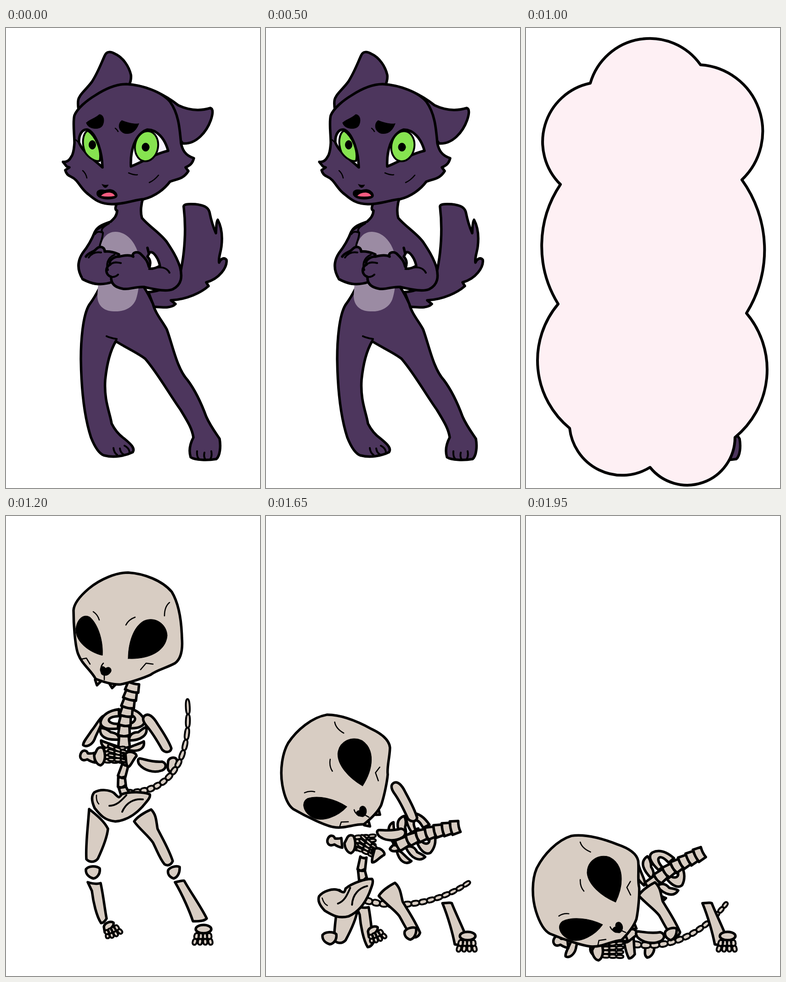
Recreate the animation shown at these times as an HTML page. Size 553 by 1000 pixels, loop 2.25 s.

```html
<!DOCTYPE html>
<html lang="en">
<head>
<meta charset="utf-8">
<title>Cat to bones</title>
<style>
html, body { margin: 0; width: 100%; height: 100%; overflow: hidden; background: #fff; }
svg { display: block; width: 100%; height: 100%; }
path, ellipse { stroke: #000; stroke-width: 5.5; stroke-linejoin: round; stroke-linecap: round; }
#cat { fill: #4d365d; }
#bones { fill: #d8cdc3; }
#puff { fill: #fef0f4; }
#puff path { vector-effect: non-scaling-stroke; stroke-width: 6; }
.line { fill: none; }
.thin { fill: none; stroke-width: 2.5; }
.ink { fill: #000; stroke-width: 1; }
.flat { stroke: none; }
.small { stroke-width: 4; }
</style>
</head>
<body>
<svg viewBox="0 0 553 1000">
<g id="cat">
  <path d="M387 390C385 383 395 382 412 383C430 385 440 389 443 400C447 420 452 435 457 446C458 435 457 423 461 417C468 430 472 450 469 475C467 490 462 500 464 510C467 503 474 497 480 504C482 520 465 545 436 553L441 561C425 575 395 590 359 592L369 600C360 610 340 607 322 606L310 574C345 573 380 545 382 520C388 490 393 440 387 390Z"/>
  <path d="M243 378C236 392 238 396 242 397C241 410 234 415 228 421C212 427 200 430 193 444C186 462 178 475 167 489C153 510 157 530 167 546C180 552 190 557 205 557L203 566C196 580 190 590 181 602C167 625 163 680 163 720C164 790 172 850 185 890C193 910 202 925 213 929C235 935 260 930 276 922C282 913 270 903 258 893C245 884 236 872 230 860C226 835 213 810 216 765C219 735 225 705 239 681C265 697 288 707 303 719C330 750 355 795 380 830C395 855 405 870 408 890C400 905 398 920 402 933C412 940 440 940 458 937C466 930 468 910 465 893C455 878 445 865 436 845C425 815 410 785 395 765C372 740 363 690 350 655C340 637 325 620 320 600C312 582 306 572 300 563C330 570 350 573 363 568C383 558 384 540 379 520C372 498 360 480 350 465C335 445 312 432 296 413C292 400 294 382 299 368"/>
  <path class="flat" fill="#9b8ba3" d="M238 443C265 443 285 470 290 500C292 540 290 570 283 590C275 610 255 617 235 616C210 616 198 600 199 580C203 530 203 500 206 475C210 455 222 443 238 443Z"/>
  <path fill="#fff" d="M313 488C320 484 332 500 335 517C325 523 318 524 311 523C315 515 316 505 308 497Z"/>
  <path class="line" d="M311 490L308 478"/>
  <path d="M174 497C180 487 190 488 196 481C204 472 215 476 215 486C230 484 240 490 246 492L232 552C205 561 185 556 167 546"/>
  <path d="M300 563C280 562 270 569 255 567C237 564 228 556 229 541C216 537 215 520 227 514C222 506 236 496 246 497C262 493 272 494 277 497C273 488 285 485 292 490C302 500 308 505 311 519"/>
  <path class="line small" d="M180 499C186 490 196 486 207 488M227 514C234 508 242 509 250 511M229 541C236 542 240 540 244 536M222 526C218 515 220 500 236 493M318 524C335 517 350 520 356 532M211 446C210 460 205 466 204 475M194 448C198 441 206 443 211 445C203 438 215 430 224 425M196 440L218 426M219 670C227 674 235 675 241 676L239 681"/>
  <path class="line small" d="M234 913Q235 923 242 928M248 914Q249 923 256 927M258 908Q268 913 269 922M416 920Q415 932 420 937M432 923Q430 933 434 938M447 920Q449 931 445 937"/>
  <path d="M158 178C156 165 156 155 160 150C163 142 175 133 187 117C200 97 208 75 215 60C219 50 228 51 237 56C255 64 268 84 272 102C273 110 270 120 268 125"/>
  <path d="M264 123C310 125 350 148 375 168C400 180 425 180 445 174C452 176 450 188 446 200C437 225 415 253 385 251L345 200"/>
  <path d="M262 122C240 122 215 133 195 146C175 158 155 175 149 190C145 205 149 230 149 250C148 265 146 275 142 280C138 288 132 292 124 291L132 301L138 303L129 309C131 317 136 321 141 323C157 330 160 345 175 358C190 370 200 382 230 383C260 383 280 373 300 372C325 366 345 350 357 334C372 328 386 329 397 311L391 303C400 299 406 295 409 283C390 277 384 265 381 250C378 215 375 185 357 160C340 140 300 124 262 122Z"/>
  <path class="ink" d="M175 206C180 200 195 196 203 188C212 188 216 200 210 212C205 222 178 221 175 206ZM289 208C278 210 262 205 252 201C243 208 244 224 258 229C275 232 284 222 289 208Z"/>
  <path class="thin" d="M238 218Q241 220 244 225M167 310Q174 316 176 326M267 315Q278 320 286 319M312 336Q323 331 332 320M152 243L160 251"/>
  <path fill="#f8f4ff" d="M159 249C158 232 166 219 178 221C194 227 209 264 210 303C197 290 168 272 159 249Z"/>
  <path fill="#86e350" class="small" d="M178 223C166 230 165 252 172 270C180 283 195 291 204 289C209 265 195 235 178 223Z"/>
  <ellipse class="ink" cx="188" cy="254" rx="7.5" ry="9.5"/>
  <path fill="#f8f4ff" d="M272 301C270 265 282 230 307 221C328 220 346 240 353 267C325 273 300 290 272 301Z"/>
  <ellipse fill="#86e350" class="small" cx="306" cy="257" rx="25" ry="33" transform="rotate(10 306 257)"/>
  <ellipse class="ink" cx="304" cy="259" rx="8" ry="9"/>
  <path class="ink" d="M209 340Q216 343 223 341Q216 354 209 340Z"/>
  <path d="M200 362C198 355 205 352 215 355C222 353 230 350 238 359C242 365 240 368 232 369C220 371 205 370 200 362Z" fill="#000"/>
  <path class="flat" fill="#f75c81" d="M207 365C213 357 232 354 237 365Q222 368 207 365Z"/>
</g>

<g id="bones">
  <g data-k="190 470 300 705 20 103 926 -10"><path d="M211 435C203 440 196 455 186 467C178 480 168 490 168 498C175 504 188 497 193 485C198 470 210 455 211 435Z"/></g>
  <g data-k="361 540 285 700 0 268 944 0"><path d="M353 533C355 525 368 522 372 530C374 545 365 555 357 556C350 552 352 543 353 533Z"/></g>
  <path id="tail" class="small"/>
  <g data-k="253 575 210 777 -8 190 830 -8"><path id="spine"/></g>
  <g data-k="196 695 172 872 3 110 850 3"><path d="M181 637C190 645 212 660 222 680C220 700 207 730 200 745C192 755 180 752 175 746C173 715 178 680 181 637Z"/></g>
  <g data-k="189 775 138 918 0 155 946 0"><path d="M174 768C180 760 197 760 204 766C206 778 198 787 190 788C180 785 173 778 174 768Z"/></g>
  <g data-k="198 840 214 892 2 219 916 5"><path d="M178 796C190 800 200 800 206 798C212 825 215 855 219 875C215 882 210 885 207 885C197 870 190 840 187 815Z"/></g>
  <g data-k="235 902 244 912 0 145 885 0"><path d="M213 893C215 884 228 880 234 884C236 892 225 900 215 905Z"/><path id="toesL" class="small"/></g>
  <g data-k="402 838 412 888 8 412 888 8"><path d="M368 796C375 795 383 792 388 793C400 815 425 850 437 875C430 882 415 881 407 881C400 860 385 825 368 796Z"/></g>
  <g data-k="430 910 439 925 0 439 925 0"><path id="toesR" class="small"/><ellipse cx="430" cy="898" rx="17" ry="9"/></g>
  <g data-k="250 630 180 834 -20 140 850 -20">
    <path d="M192 601C205 593 225 595 235 602C245 612 245 615 252 605C270 598 300 600 313 605C316 612 305 622 297 632C285 645 265 662 238 664C215 662 205 650 193 635C186 620 186 608 192 601Z"/>
    <path class="line small" d="M225 630C240 630 250 620 262 607M253 643C262 622 280 614 298 616"/><path class="thin" d="M197 607Q196 620 202 626"/>
  </g>
  <g data-k="276 372 412 677 64 378 735 49">
    <path d="M246 420C225 423 210 432 206 447C204 460 220 465 244 462L244 452C228 452 220 446 226 440C232 435 240 436 246 435ZM272 420C285 422 297 432 302 445C302 458 285 463 266 461L267 452C280 450 285 440 277 435L270 435Z"/>
    <path d="M205 461C203 478 215 488 246 486C246 476 240 472 228 470C222 465 215 460 205 461ZM305 459C310 475 295 488 268 488C268 476 275 470 288 470C294 466 298 461 305 459Z"/>
    <path d="M207 488C206 502 222 512 248 508C246 498 228 498 207 488ZM300 490C303 505 290 514 266 509C268 499 284 499 300 490Z"/>
    <path id="neck"/>
  </g>
  <g data-k="330 472 302 621 5 150 850 40"><path d="M302 434C310 428 320 435 330 452C342 470 355 490 360 505C358 515 347 515 340 508C330 490 318 470 305 455C297 445 297 438 302 434Z"/></g>
  <g data-k="320 700 289 859 -4 289 858 -4"><path d="M316 638C300 645 285 655 279 664C290 680 310 695 320 710C330 730 335 745 345 757C352 762 360 758 363 750C355 725 340 700 330 680C327 665 328 650 316 638Z"/></g>
  <g data-k="366 774 315 907 0 316 908 0"><path d="M353 770C358 762 372 760 378 763C379 776 373 786 365 788C356 785 351 778 353 770Z"/></g>
  <g data-k="178 521 150 706 0 76 924 0"><path d="M164 514C168 508 176 509 178 516Q186 517 192 515L194 536Q184 534 177 529C164 535 158 524 164 514Z"/></g>
  <g data-k="206 522 185 713 0 158 946 0"><path id="fingersL" class="small"/><path d="M198 508C203 500 212 503 213 508C218 522 215 538 206 542C198 541 192 530 192 520Z"/></g>
  <g data-k="271 528 243 738 20 228 912 20"><path id="fingersR" class="small"/><path d="M260 517C268 508 285 515 284 522C276 530 272 545 265 546C260 538 262 528 260 517Z"/></g>
  <g data-k="318 542 274 692 -12 271 915 -6"><path d="M291 527C300 528 318 536 340 534C350 538 350 548 340 553C320 560 300 552 290 540C286 533 287 528 291 527Z"/></g>
  <g id="skull" data-k="308 267 194 529 -60 172 784 -67">
    <path d="M194 356L198 368L206 360M226 366L231 374L239 366"/>
    <path d="M266 123C240 123 205 137 180 158C160 175 148 190 147 205C147 240 151 285 157 300C165 322 185 335 195 354C215 362 235 367 250 366C270 362 300 352 315 345C328 335 350 330 368 320C382 310 385 290 383 265C382 225 376 190 361 165C340 140 300 125 266 123Z"/>
    <path class="ink" d="M152 245C155 222 170 212 183 220C200 235 212 270 210 303C185 298 150 275 152 245ZM266 310C266 275 278 240 300 228C325 217 350 235 351 260C348 295 310 312 266 310ZM205 335C205 325 212 325 217 331C223 326 230 330 229 337C226 346 215 350 208 344Z"/>
    <path class="thin" d="M212 320Q206 326 207 333M214 346L214 356M190 208Q200 215 203 226M261 237Q267 225 281 220M345 217Q345 197 356 188M165 311L175 309L183 322M293 334L305 320L320 322"/>
  </g>
</g>

<g id="puff">
  <g id="puffSmall">
    <path d="M188 374C188 355 200 345 214 346L225 390Z"/>
    <path d="M223 427C208 400 208 360 216 335C230 290 275 262 320 263C365 266 405 300 417 345C420 375 405 395 385 405C370 412 360 415 350 421C370 408 395 405 415 420C440 445 442 500 425 550C415 580 385 605 374 635C368 665 368 690 355 710C340 730 320 734 305 733C275 730 255 705 242 680C237 668 235 660 232 656C210 662 175 662 160 645C148 635 147 615 143 599C110 598 82 575 81 540C81 505 105 475 133 467C108 460 98 435 106 410C120 378 160 362 190 373C200 376 202 380 205 383"/>
  </g>
  <path id="puffBig" d="M140 120A135 135 0 0 1 380 80A145 145 0 0 1 470 330A260 260 0 0 1 480 620A190 190 0 0 1 455 890A104 104 0 0 1 270 955A115 115 0 0 1 95 870A190 190 0 0 1 70 600A240 240 0 0 1 75 340A130 130 0 0 1 140 120Z"/>
</g>
</svg>
<script>
const LOOP = 2250;
const $ = id => document.getElementById(id);
const mix = (a, b, k) => a + (b - a) * k;
const show = (el, on) => { el.style.display = on ? '' : 'none'; };

// Fall progress: 0 standing, 1 half way down, 2 at rest.
const FALL = [[1200, 0], [1400, .12], [1500, .4], [1600, .8], [1650, 1], [1700, 1.25], [1750, 1.6], [1850, 1.94], [1950, 2]];
const PUFF = [[700, 'puffSmall', .5, .5], [800, 'puffSmall', 1, 1], [900, 'puffBig', .84, .8], [1000, 'puffBig', 1, 1]];
const TAIL = [
  [262, 602, 335, 602, 408, 560, 395, 398],
  [215, 835, 290, 858, 380, 840, 444, 795],
  [230, 930, 330, 948, 400, 890, 438, 840]
];
const at = (table, t) => table.filter(row => row[0] <= t).pop();
const between = (poses, p) => {
  const i = p < 1 ? 0 : 1;
  return poses[i].map((v, n) => mix(v, poses[i + 1][n], p - i));
};

// Small bones strung along a cubic curve, tapering from width w0 to w1.
function beads(c, n, w0, w1, boxy) {
  const point = k => [0, 1].map(a => {
    const j = 1 - k;
    return j * j * j * c[a] + 3 * j * j * k * c[a + 2] + 3 * j * k * k * c[a + 4] + k * k * k * c[a + 6];
  });
  let d = '';
  for (let i = 0; i < n; i++) {
    const [ax, ay] = point(i / n), [bx, by] = point((i + 1) / n);
    const len = Math.hypot(bx - ax, by - ay) || 1, w = mix(w0, w1, i / n) / 2;
    const nx = -(by - ay) / len * w, ny = (bx - ax) / len * w;
    const q = (k, s) => `${mix(ax, bx, k) + nx * s} ${mix(ay, by, k) + ny * s}`;
    d += boxy
      ? `M${q(0, -.9)}Q${q(.15, 0)} ${q(0, .9)}L${q(1, 1.1)}Q${q(1.15, 0)} ${q(1, -1.1)}Z`
      : `M${q(0, 0)}Q${q(0, 1.1)} ${q(.5, 1)}Q${q(1, 1)} ${q(1, 0)}Q${q(1, -1)} ${q(.5, -1)}Q${q(0, -1.1)} ${q(0, 0)}Z`;
  }
  return d;
}
const line = (x, y, u, v) => [x, y, mix(x, u, 1 / 3), mix(y, v, 1 / 3), mix(x, u, 2 / 3), mix(y, v, 2 / 3), u, v];
const fan = (id, n, w, ray) => $(id).setAttribute('d', [0, 1, 2, 3].map(i => beads(line(...ray(i)), n, w, w - 2)).join(''));

$('neck').setAttribute('d', beads([278, 363, 268, 405, 254, 440, 257, 502], 7, 27, 22, true));
$('spine').setAttribute('d', beads([260, 540, 246, 570, 250, 590, 260, 606], 3, 15, 18, true));
fan('toesL', 2, 9, i => [219 + i * 6, 900 - i * 3, 222 + i * 10, 918 - i * i * 1.2]);
fan('toesR', 2, 10, i => [417 + i * 8, 907, 409 + i * 12.5, 932]);
fan('fingersL', 3, 8, i => [214, 508 + i * 8, 260, 504 + i * 10]);
fan('fingersR', 3, 8, i => [264, 516 + i * 5, 222, 499 + i * 10]);

const parts = [...document.querySelectorAll('[data-k]')].map(el => {
  const [x, y, ...rest] = el.dataset.k.split(' ').map(Number);
  return { el, x, y, poses: [[x, y, 0], rest.slice(0, 3), rest.slice(3)] };
});

function poseBones(p) {
  for (const { el, x, y, poses } of parts) {
    const [u, v, r] = between(poses, el.id === 'skull' && p > 1.9 ? 2 : p);
    el.setAttribute('transform', `translate(${u - x} ${v - y}) rotate(${r} ${x} ${y})`);
  }
  $('tail').setAttribute('d', beads(between(TAIL, p), 14, 13, 8));
}

function draw(t) {
  show($('cat'), t < 1200);
  show($('bones'), t >= 1200);
  show($('puff'), t >= 700 && t < 1200);
  if (t >= 1200) return poseBones(at(FALL, t)[1]);
  const shaken = t < 700 && Math.floor(t / 100) % 2;
  $('cat').setAttribute('transform', `translate(${shaken ? -8 : 0} 0)`);
  if (t < 700) return;
  const [, id, sx, sy] = at(PUFF, t);
  show($('puffSmall'), id === 'puffSmall');
  show($('puffBig'), id === 'puffBig');
  $('puff').setAttribute('transform', `translate(265 500) scale(${sx} ${sy}) translate(-265 -500)`);
}

const start = performance.now();
function tick() {
  draw((performance.now() - start) % LOOP);
  requestAnimationFrame(tick);
}
tick();
</script>
</body>
</html>
```
